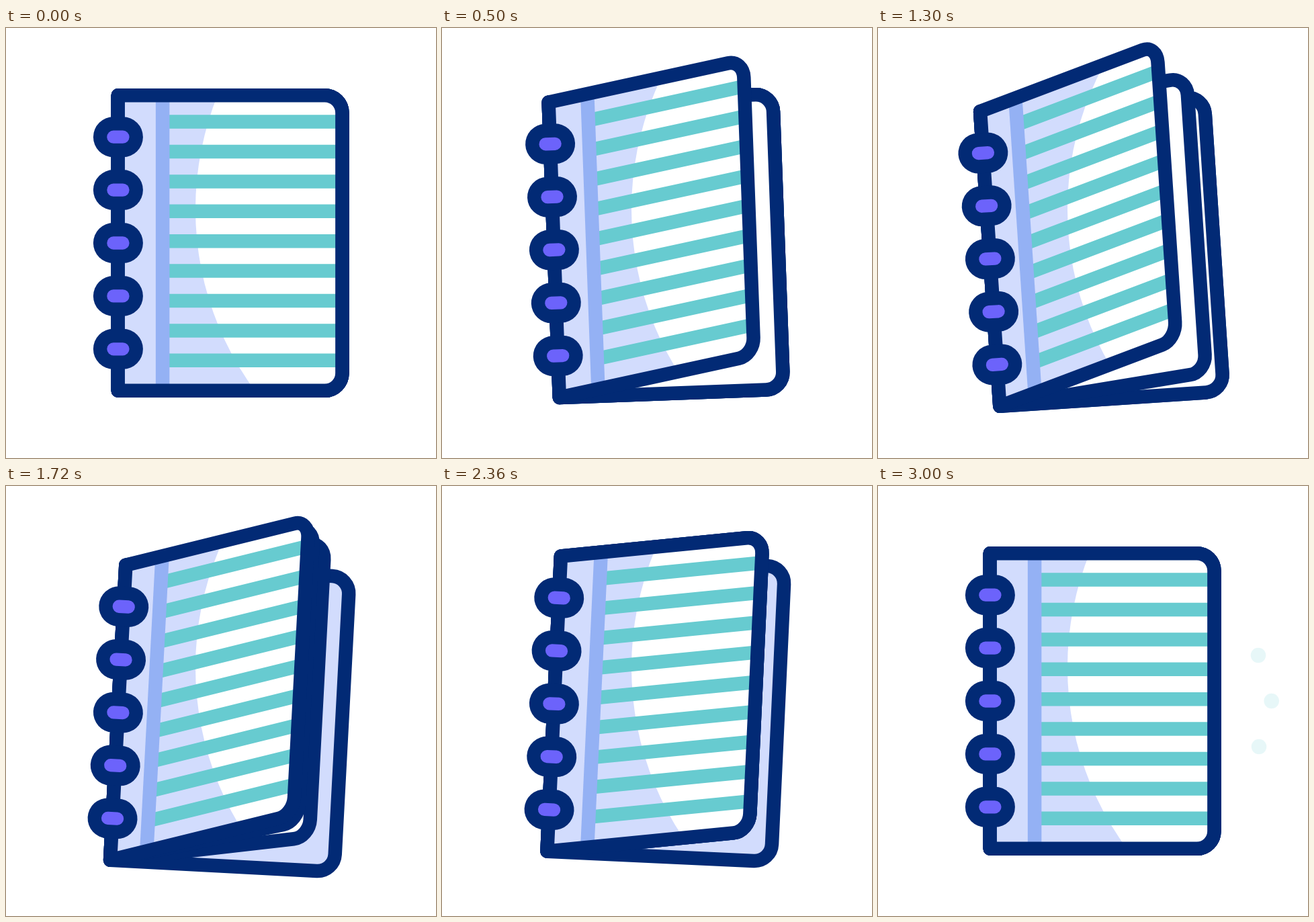
These frames come from a looping animation (640x640 px, 3200 ms). An HTML page with a canvas:

```html
<!DOCTYPE html>
<html lang="en">
<head>
<meta charset="utf-8">
<title>Notebook</title>
<style>
  html, body { margin: 0; height: 100%; overflow: hidden; background: #fff; }
  canvas { display: block; width: 100vw; height: 100vh; }
</style>
</head>
<body>
<canvas width="640" height="640"></canvas>
<script>
const ctx = document.querySelector('canvas').getContext('2d');
const NAVY = '#022a75', TEAL = '#67cbd0', PALE = '#d2dcfd', BAR = '#94b1f4', PURPLE = '#6c63fb';
const LOOP = 3200, END = 3000, CLOSE = 1960, REST = 2800;
const SPINE = 166.7, MID = 320, W = 333.7, H = 219.8, LINE = 20.5;

// Smooth 0..1 between two times
function ease(t, from, to) {
  const u = Math.min(1, Math.max(0, (t - from) / (to - from)));
  return u * u * (3 - 2 * u);
}

// Builds a path in page space, leaving the pen unskewed
function pagePath(open, build) {
  ctx.save();
  ctx.transform(1 - 0.195 * open, -0.2445 * open, 0, 1, 0, 0);
  ctx.beginPath();
  build();
  ctx.restore();
}

function stroke(color, width, cap = 'butt') {
  ctx.strokeStyle = color;
  ctx.lineWidth = width;
  ctx.lineCap = cap;
  ctx.stroke();
}

function segment(x1, y1, x2, y2) {
  ctx.moveTo(x1, y1);
  ctx.lineTo(x2, y2);
}

function sheet(open, fill, decorate) {
  const outline = () => pagePath(open, () => ctx.roundRect(0, -H, W, 2 * H, [0, 26, 26, 0]));
  outline();
  ctx.fillStyle = fill;
  ctx.fill();
  if (decorate) {
    ctx.save();
    ctx.clip();
    decorate();
    ctx.restore();
    outline();
  }
  stroke(NAVY, LINE);
}

function frontArt(open) {
  // The highlight stays put on the stage while the page moves
  ctx.save();
  ctx.resetTransform();
  ctx.beginPath();
  ctx.arc(738, 270, 456, 0, 7);
  ctx.fillStyle = '#fff';
  ctx.fill();
  ctx.restore();

  pagePath(open, () => {
    for (let i = -4; i <= 4; i++) segment(66.4, i * 44.4 - 2.8, W, i * 44.4 - 2.8);
  });
  stroke(TEAL, LINE);
  pagePath(open, () => segment(66.4, -H, 66.4, H));
  stroke(BAR, LINE);
}

function dots(t) {
  const u = (t - 2400) / (END - 2400);
  if (u <= 0) return;
  const reach = 1 - 0.436 * (1 - u) ** 2;
  ctx.globalAlpha = 1 - ease(t, 2580, 3140);
  ctx.fillStyle = TEAL;
  for (const [dx, dy] of [[228, -68], [247.7, 0], [229, 68]]) {
    ctx.beginPath();
    ctx.arc(338 + dx * reach, MID + dy * reach, 11.3, 0, 7);
    ctx.fill();
  }
  ctx.globalAlpha = 1;
}

function draw(t) {
  ctx.resetTransform();
  ctx.clearRect(0, 0, 640, 640);
  dots(t);

  const tilt = -5 * ease(t, 0, 1120) + 10 * ease(t, 1120, CLOSE) - 5 * ease(t, CLOSE, REST);
  const drop = 24.3 * (ease(t, 0, 1120) - ease(t, 1120, REST));
  const shut = ease(t, CLOSE, REST);
  const opened = (from, to) => ease(t, from, to) - shut;
  const front = opened(0, 840);

  ctx.translate(SPINE, MID + drop);
  ctx.rotate(tilt * Math.PI / 180);
  ctx.lineJoin = 'round';

  sheet(0, PALE);
  sheet(opened(1400, CLOSE), '#fff');
  sheet(opened(840, CLOSE), '#fff');
  sheet(front, PALE, () => frontArt(front));

  for (let i = -2; i <= 2; i++) {
    ctx.beginPath();
    segment(-6.8, i * 78.9, 7.2, i * 78.9);
    stroke(NAVY, 60, 'round');
    stroke(PURPLE, 19.3, 'round');
  }
}

function tick() {
  draw(Math.min(performance.now() % LOOP, END));
  requestAnimationFrame(tick);
}
tick();
</script>
</body>
</html>
```
